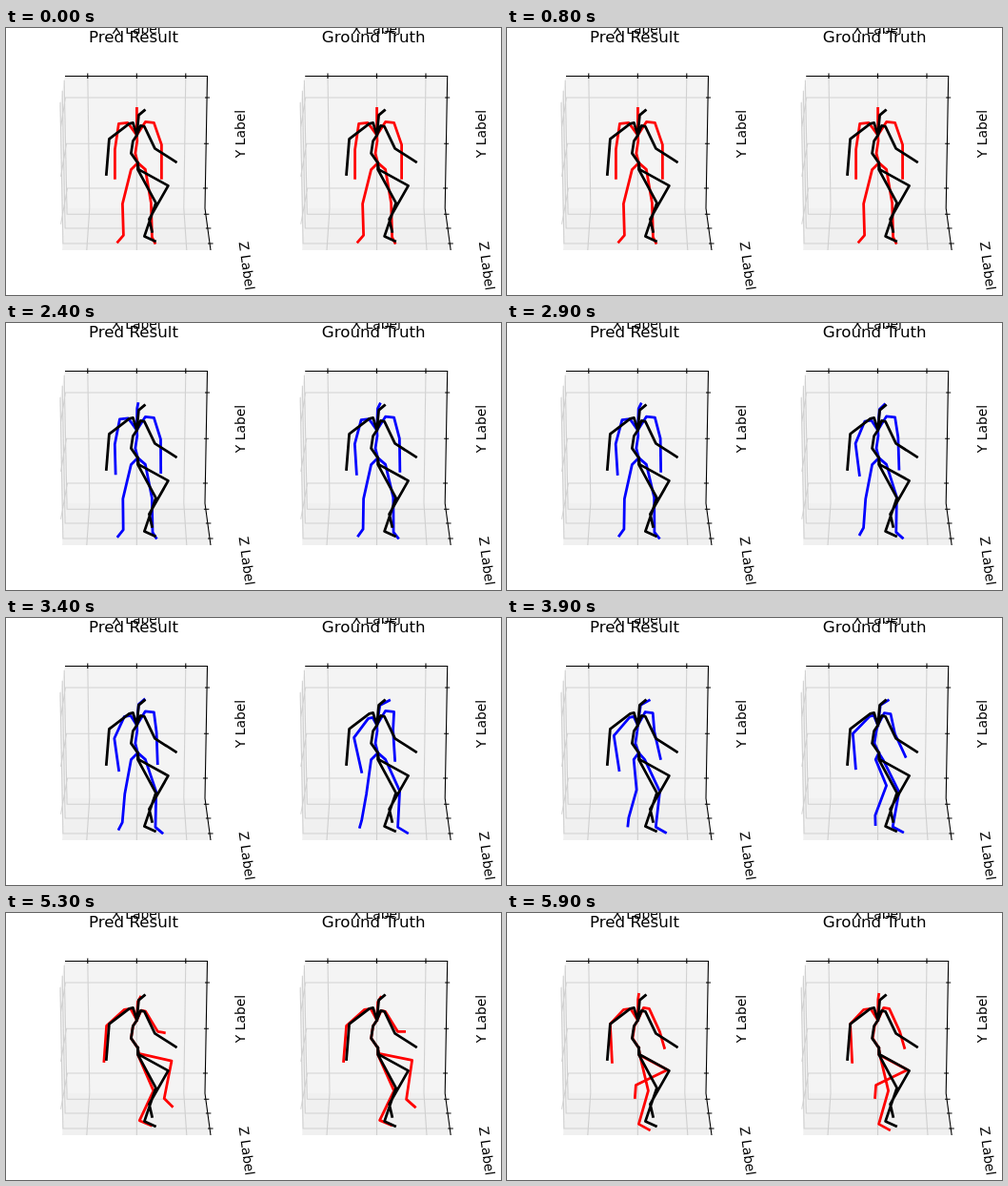
An HTML page that plays this animation: 520 by 280 pixels, repeating every 6000 ms.

```html
<!DOCTYPE html>
<html lang="en">
<head>
<meta charset="utf-8">
<title>Pose comparison</title>
<style>
  html, body { margin: 0; width: 100%; height: 100%; overflow: hidden; background: #fff; }
  svg { display: block; width: 520px; height: 280px; }
  text { font-family: "DejaVu Sans", sans-serif; font-size: 13.89px; text-anchor: middle; }
  .title { font-size: 16.67px; }
  path { fill: none; }
  .grid { stroke: #b0b0b0; stroke-opacity: .5; stroke-width: 1.1; }
  .axis { stroke: #000; stroke-width: 1.1; }
  .bones { stroke: #000; stroke-width: 2.78; stroke-linecap: square; stroke-linejoin: round; }
</style>
</head>
<body>
<svg id="stage" viewBox="0 0 520 280"></svg>
<script>
const STEP = 100, LOOP = 6000, POSE = 45;
const BLUE_FROM = 10, BLUE_TO = 44;
const PELVIS = [138, 141], NECK = [137, 112];

// Joints: head | hip knee ankle toe | knee ankle toe | shoulder elbow hand | shoulder elbow hand
const key = (at, joints) => ({ at, joints: joints.split(" ").map(p => p.split(",").map(Number)) });
const keys = [
  key(0, "137,84 131,148 122,184 123,217 117,224 152,183 153,219 156,225 118,100 114,127 114,157 155,99 163,122 163,157"),
  key(34, "150,86 131,148 126,184 121,212 119,219 161,181 159,219 169,225 128,105 113,125 121,161 155,98 154,117 156,149"),
  key(POSE, "145,86 139,148 170,165 150,200 153,213 157,183 145,218 156,223 129,100 108,116 105,153 145,103 156,126 178,140"),
  key(53, "141,88 139,147 174,154 168,195 177,203 155,186 140,217 152,222 124,101 105,118 102,155 146,103 159,124 166,124"),
  key(59, "138,85 138,148 168,164 135,180 134,193 148,186 138,221 149,227 122,101 108,116 110,156 149,100 160,124 165,141")
];

const mix = (a, b, u) => a.map((v, i) => v + (b[i] - v) * u);

function arm(shoulder, elbow, hand) {
  const collar = [mix(NECK, shoulder, .5)[0], shoulder[1] - 1];
  return [NECK, collar, shoulder, elbow, mix(elbow, hand, .7), hand];
}

function pose(step) {
  let i = 0;
  while (i < keys.length - 2 && keys[i + 1].at <= step) i++;
  const a = keys[i], b = keys[i + 1];
  const t = Math.min(1, (step - a.at) / (b.at - a.at));
  const u = i === 0 ? t ** 4 : t; // stands almost still, then sets off
  const j = a.joints.map((p, k) => mix(p, b.joints[k], u));

  if (a.at === POSE) { // the swinging foot kicks forward
    const kick = Math.sin(Math.PI * t);
    for (const p of [j[3], j[4]]) {
      p[0] += 37 * kick;
      p[1] -= 17 * kick;
    }
  }

  const [head, hip] = j;
  const spine = [131 + (139 - hip[0]) * .55, 131];
  const chest = [spine[0] + 2, 118];
  const nose = [mix(NECK, head, .25)[0], head[1] + 5];
  return [
    [PELVIS, spine, chest, NECK, nose, head],
    [PELVIS, ...j.slice(1, 5)],
    [PELVIS, [277 - hip[0], 148], ...j.slice(5, 8)],
    arm(...j.slice(8, 11)),
    arm(...j.slice(11))
  ];
}

// The prediction trails the truth while filling the gap, then runs slightly ahead
function predictedStep(step) {
  if (step < BLUE_FROM) return step;
  if (step >= POSE) return step + .4;
  return step - 5 * Math.sin(Math.PI * (step - BLUE_FROM) / (POSE - BLUE_FROM));
}

const toPath = limbs => limbs.map(l => "M" + l.join("L")).join("");

function add(parent, name, attrs, text) {
  const el = document.createElementNS("http://www.w3.org/2000/svg", name);
  for (const k in attrs) el.setAttribute(k, attrs[k]);
  if (text) el.textContent = text;
  return parent.appendChild(el);
}

function drawAxes(g) {
  const pane = (points, fill) => add(g, "polygon", { points, fill });
  pane("62,50 65,189 59,233 56.5,82", "#f2f2f2");
  pane("62,50 212,50 209,189 65,189", "#f4f4f4");
  pane("65,189 209,189 215,233 59,233", "#f0f0f0");

  let grid = "";
  let axis = "M62,50.5H211.5L209,189L215,233";
  for (const side of [-1, 0, 1]) {
    const x = 137.3 + side * 51.5;
    grid += `M${x},50L${x - side * 2},189L${x + side},233`;
    axis += `M${x},47.5V53`;
  }
  for (const y of [73, 121.3, 168]) {
    const inset = (y - 50) / 46;
    grid += `M${211.5 - inset},${y}H${62 + inset}L57.5,${y * 1.07 + 26}`;
    axis += `M${209.5 - inset},${y}H${214.5 - inset}`;
  }
  for (const y of [195.3, 210, 226]) {
    const out = (y - 189) / 7.3;
    grid += `M${209 + out},${y}H${65 - out}L${62 - out},${50 + out * 5.5}`;
    axis += `M${207 + out},${y}H${212.5 + out}`;
  }
  add(g, "path", { class: "grid", d: grid });
  add(g, "path", { class: "axis", d: axis });
}

const stage = document.getElementById("stage");

function makePanel(x, title, timing) {
  const g = add(stage, "g", { transform: `translate(${x})` });
  drawAxes(g);
  const bones = add(g, "g", { class: "bones", transform: "translate(.4 .4)" });
  const moving = add(bones, "path", {});
  add(bones, "path", { d: toPath(pose(POSE)) });
  add(g, "text", { x: 137, y: 6 }, "X Label");
  add(g, "text", { transform: "translate(246.3 111) rotate(-90)", dy: ".36em" }, "Y Label");
  add(g, "text", { transform: "translate(253 249.5) rotate(82)", dy: ".36em" }, "Z Label");
  add(g, "text", { class: "title", x: 134, y: 15.3 }, title);
  return { moving, timing };
}

const panels = [
  makePanel(0, "Pred Result", predictedStep),
  makePanel(252.2, "Ground Truth", step => step)
];
const start = performance.now();
let shown = -1;

function render() {
  const step = Math.floor(Math.max(0, performance.now() - start) % LOOP / STEP);
  if (step !== shown) {
    shown = step;
    const color = step >= BLUE_FROM && step < BLUE_TO ? "#00f" : "#f00";
    for (const { moving, timing } of panels) {
      moving.setAttribute("d", toPath(pose(timing(step))));
      moving.setAttribute("stroke", color);
    }
  }
  requestAnimationFrame(render);
}
render();
</script>
</body>
</html>
```
